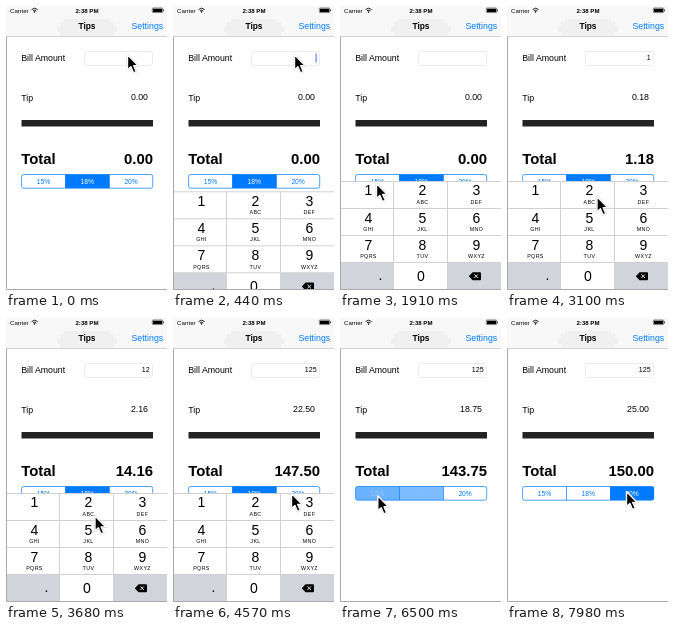
Animation, 161 px wide and 284 px high, one loop 8 s. Source, as an HTML page:

```html
<!DOCTYPE html>
<html lang="en">
<head>
<meta charset="utf-8">
<title>Tips</title>
<style>
  html, body { margin: 0; width: 100%; height: 100%; overflow: hidden; background: #fff; }
  svg { display: block; width: 100%; height: 100%; }
  text { font-family: "Liberation Sans", Arial, sans-serif; font-size: 8.8px; fill: #000; }
  .bold { font-weight: bold; }
  .mid { text-anchor: middle; }
  .end { text-anchor: end; }
  .total { font-weight: bold; font-size: 14.9px; }
  .status { font-size: 6.1px; }
  .blue { fill: #007aff; }
  .seg { font-size: 6.7px; }
  .digit { font-size: 14px; }
  .letters { font-size: 5.3px; letter-spacing: .4px; }
  #cursor { filter: drop-shadow(.3px .7px .6px rgba(0, 0, 0, .45)); }
</style>
</head>
<body>
<svg viewBox="0 0 161 284">
  <rect width="161" height="284" fill="#fff"/>

  <rect width="161" height="30.5" fill="#f8f8f8"/>
  <path d="M58 13H104V16H108V20H111V26H108V30H54V26H51V20H54V16H58Z" fill="#f0f0f0"/>
  <path d="M0 30.5H161" stroke="#b8b8b8" stroke-width=".6"/>
  <text x="4" y="6.6" class="status">Carrier</text>
  <g fill="none" stroke="#000" stroke-width=".9">
    <path d="M25.6 3.6Q28.6 .8 31.6 3.6M26.9 5Q28.6 3.4 30.3 5"/>
    <circle cx="28.6" cy="6" r=".4" fill="#000"/>
  </g>
  <text x="81" y="6.6" class="status bold mid">2:38 PM</text>
  <rect x="146.3" y="2" width="10.4" height="4.6" rx=".8" fill="none" stroke="#000" stroke-width=".5"/>
  <path d="M147 2.7H156V5.9H147ZM157.3 3.4H158V5.2H157.3Z"/>
  <text x="81" y="23" class="bold mid" style="font-size:8.4px">Tips</text>
  <text x="157.2" y="23" class="blue end">Settings</text>

  <text x="15.2" y="55">Bill Amount</text>
  <rect x="78.5" y="45.5" width="68" height="14" rx="2.5" fill="#fff" stroke="#e2e2e2" stroke-width=".7"/>
  <text id="bill" x="143.6" y="54.4" class="end" style="font-size:7.1px"></text>
  <rect id="caret" x="142.6" y="47.5" width="1" height="9" fill="#426bf2"/>
  <text x="15.2" y="94.5">Tip</text>
  <text id="tip" x="142" y="94.1" class="end"></text>
  <rect x="15.5" y="114" width="131.5" height="6.5" fill="#222"/>
  <text x="15.2" y="158" class="total">Total</text>
  <text id="total" x="147" y="158" class="total end"></text>

  <clipPath id="pill"><rect x="15.5" y="168.3" width="131.5" height="14" rx="2"/></clipPath>
  <g id="segments" clip-path="url(#pill)"></g>
  <g fill="none" stroke="#007aff" stroke-width=".7">
    <rect x="15.6" y="168.5" width="131.1" height="13.7" rx="2"/>
    <path d="M59.5 168.5V182M103.5 168.5V182"/>
  </g>

  <g id="keyboard"></g>
  <path d="M.5 31V283.5H161" fill="none" stroke="#aaa"/>
  <path id="cursor" d="M0 0V15L3.4 11.9L6 18L8.8 16.8L6.2 11H10.8Z"
        fill="#000" stroke="#fff" stroke-width="1.4" stroke-linejoin="round"/>
</svg>
<script>
const LOOP = 8000, TICK = 147.5, LEAD = 8;
const $ = id => document.getElementById(id);

function add(parent, tag, attrs, label) {
  const el = document.createElementNS("http://www.w3.org/2000/svg", tag);
  for (const name in attrs) el.setAttribute(name, attrs[name]);
  if (label) el.textContent = label;
  return parent.appendChild(el);
}

// Tip rate control
const rates = [15, 18, 20];
const segments = rates.map((rate, i) => {
  const width = 131.5 / 3, x = 15.5 + i * width;
  return {
    fill: add($("segments"), "rect", { x, y: 168.3, width, height: 14, fill: "#007aff" }),
    text: add($("segments"), "text", { x: x + width / 2, y: 177.5, class: "seg mid" }, rate + "%")
  };
});

// Number pad
const board = $("keyboard");
const letters = ["", "ABC", "DEF", "GHI", "JKL", "MNO", "PQRS", "TUV", "WXYZ"];
const TOP = 175, COL = 54, ROW = 27.15, HEIGHT = 110;
add(board, "rect", { y: TOP, width: 161, height: HEIGHT, fill: "#fff" });
for (const x of [0, 2 * COL]) {
  add(board, "rect", { x, y: TOP + 3 * ROW, width: COL, height: ROW + 1, fill: "#d1d5db" });
}
const flash = add(board, "rect", { y: TOP, width: COL, height: ROW, fill: "#d1d5db" });
letters.forEach((label, i) => {
  const x = 28.3 + (i % 3) * COL, y = TOP + Math.floor(i / 3) * ROW;
  add(board, "text", { x, y: y + 14.4, class: "digit mid" }, String(i + 1));
  add(board, "text", { x: x + .2, y: y + 23, class: "letters mid" }, label);
});
add(board, "text", { x: 81, y: 274.5, class: "digit mid" }, "0");
add(board, "text", { x: 40.5, y: 274, class: "digit mid" }, ".");
add(board, "path", { d: "M128.8 270.2L132.6 266.2H140Q141 266.2 141 267.2V273.2Q141 274.2 140 274.2H132.6Z" });
add(board, "path", { d: "M134.4 268.4L138 272M138 268.4L134.4 272", stroke: "#fff", "stroke-width": .9 });
for (let i = 0; i < 4; i++) {
  add(board, "path", { d: `M0 ${Math.floor(TOP + i * ROW) + .5}H161`, stroke: "#cfd1d4" });
}
for (let i = 1; i < 3; i++) {
  add(board, "path", { d: `M${i * COL - .5} ${TOP}V284`, stroke: "#cfd1d4" });
}

const HOME = { x: 121.5, y: 48.8 };
const moves = [
  { from: 9, to: 13, x: 36.5, y: 177.5 },
  { from: 17, to: 21, x: 90, y: 190.8 },
  { from: 24, to: 26, x: 88, y: 205 },
  { from: 28, to: 31, x: 118.5, y: 175.5 },
  { from: 31, to: 34, x: 126, y: 138 },
  { from: 38, to: 42, x: 37.8, y: 177.8 },
  { from: 47, to: 50, x: 119.5, y: 173.5 }
];
const ENTRY = "125", typedAt = [16, 24, 27];
const SHOW = 0, HIDE = 35, BLINK = 6.75;
const choices = [{ at: -1, index: 1 }, { at: 44, index: 0 }, { at: 53, index: 2 }];

function ease(tick, from, to) {
  const p = Math.min(1, Math.max(0, (tick - from) / (to - from)));
  return p * p * (3 - 2 * p);
}

function pointer(tick) {
  return moves.reduce((pos, move) => {
    const k = ease(tick, move.from, move.to);
    return { x: pos.x + (move.x - pos.x) * k, y: pos.y + (move.y - pos.y) * k };
  }, HOME);
}

function renderSegments(tick, made) {
  const current = made[made.length - 1], previous = made[made.length - 2];
  const fade = tick === current.at ? .58 : 1;
  segments.forEach(({ fill, text }, i) => {
    let level = 0;
    if (i === current.index) level = fade;
    else if (previous && i === previous.index && fade < 1) level = .5;
    fill.style.opacity = level;
    text.style.fill = `rgb(${255 * level}, ${122 + 133 * level}, 255)`;
  });
}

function render(tick) {
  const made = choices.filter(c => c.at <= tick);
  const rate = rates[made[made.length - 1].index];
  const typed = ENTRY.slice(0, typedAt.filter(t => t <= tick).length);
  const amount = Number(typed), tip = amount * rate / 100;
  $("bill").textContent = typed;
  $("tip").textContent = tip.toFixed(2);
  $("total").textContent = (amount + tip).toFixed(2);
  renderSegments(tick, made);

  const editing = tick > SHOW && tick <= HIDE;
  $("caret").style.opacity = editing && (tick - 1) % BLINK < 2.9 ? 1 : 0;

  // Keys 1 and 2 light up just before their digit appears
  const pressed = typedAt.slice(0, 2).indexOf(tick + 1);
  flash.style.opacity = pressed < 0 ? 0 : 1;
  flash.setAttribute("x", Math.max(0, pressed) * COL);

  const shown = ease(tick, SHOW, 3.7) - ease(tick, HIDE, 39);
  board.setAttribute("transform", `translate(0 ${HEIGHT * (1 - shown)})`);
  const { x, y } = pointer(tick);
  $("cursor").setAttribute("transform", `translate(${x} ${y})`);
}

const start = performance.now();
function loop() {
  const time = (performance.now() - start) % LOOP;
  render(Math.floor((time + LEAD) / TICK));
  requestAnimationFrame(loop);
}
loop();
</script>
</body>
</html>
```
